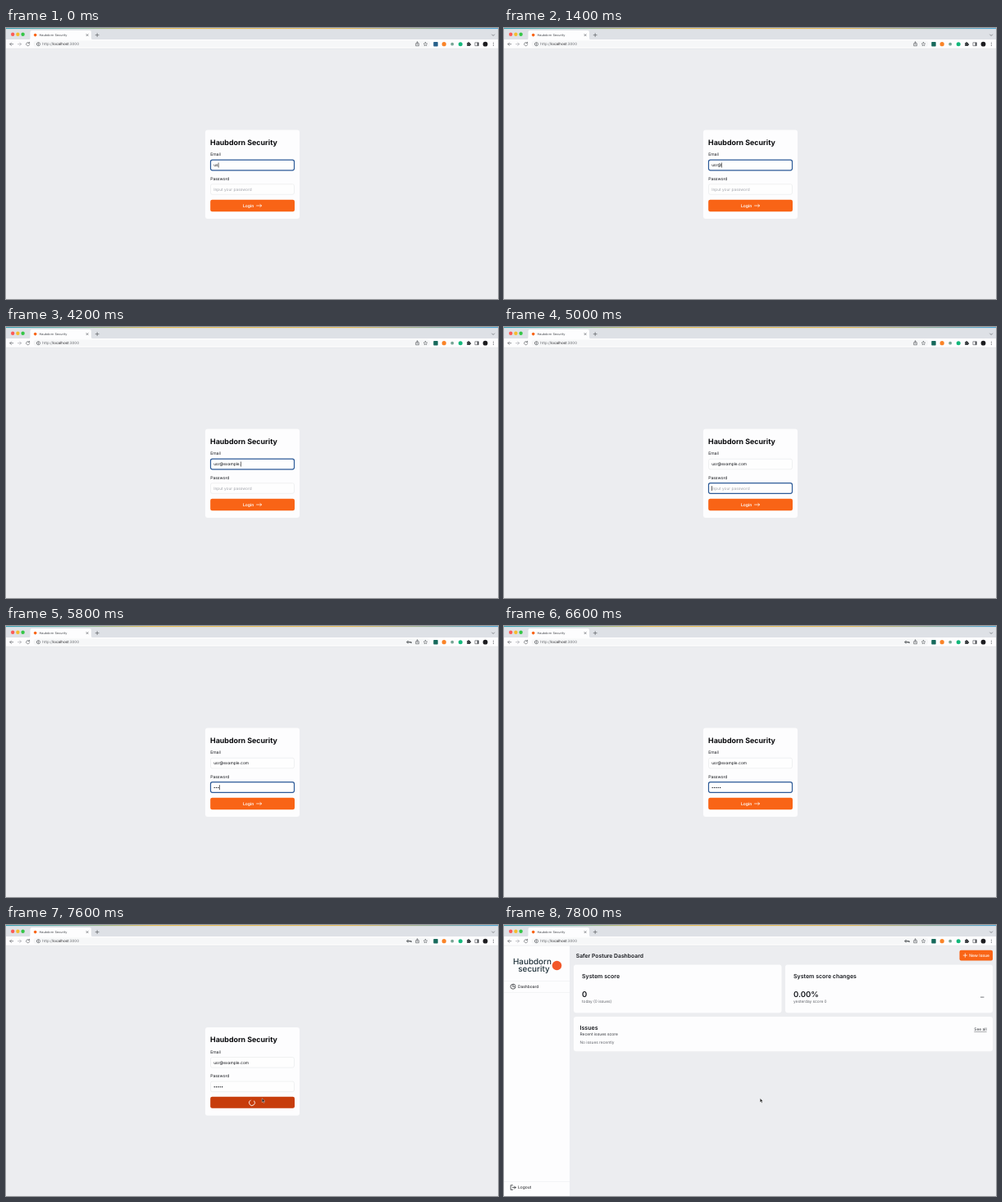
Animation, 600 px wide and 331 px high, one loop 8 s. Source, as an HTML page:

```html
<!DOCTYPE html>
<html lang="en">
<head>
<meta charset="utf-8">
<title>Login</title>
<style>
  html, body { margin: 0; height: 100%; overflow: hidden; background: #ecedf0; }
  svg { display: block; width: 100%; height: 100%; }
  text { font-family: Inter, Roboto, sans-serif; text-rendering: geometricPrecision; white-space: pre; }
  .line { fill: none; stroke-linecap: round; stroke-linejoin: round; }
</style>
</head>
<body>
<svg id="stage" viewBox="0 0 600 331"></svg>
<script>
const LOOP = 8000, STEP = 200;
const BRAND = 'Haubdorn Security';
const EMAIL = 'usr@example.com';
const ORANGE = '#f96416', INK = '#15171c', GREY = '#62656c';

// Each entry: start time, number of typed characters, caret visible
const emailKeys = [
  [0, 2, 1], [400, 2, 0], [800, 2, 1], [1000, 3, 1], [1400, 4, 1], [1800, 5, 1],
  [2200, 6, 1], [2400, 7, 1], [2600, 8, 1], [3000, 9, 1], [3200, 10, 1], [3400, 11, 1],
  [3800, 11, 0], [4200, 12, 1], [4600, 14, 1], [4800, 15, 1], [5000, 15, 0]
];
const passwordKeys = [
  [0, 0, 0], [5000, 0, 1], [5200, 1, 1], [5400, 2, 1], [5800, 3, 1],
  [6000, 4, 1], [6200, 5, 1], [6600, 5, 0], [7000, 5, 1], [7400, 5, 0]
];

const rect = (x, y, w, h, fill, r = 0, more = '') =>
  `<rect x="${x}" y="${y}" width="${w}" height="${h}" rx="${r}" fill="${fill}" ${more}/>`;
const dot = (x, y, r, fill) => `<circle cx="${x}" cy="${y}" r="${r}" fill="${fill}"/>`;
const line = (d, stroke = '#4b4e53', width = .6, more = '') =>
  `<path class="line" d="${d}" stroke="${stroke}" stroke-width="${width}" ${more}/>`;
// y is the middle of the capitals
const text = (x, y, size, str, fill = INK, weight = 400, more = '') =>
  `<text x="${x}" y="${y + size * .364}" font-size="${size}" font-weight="${weight}" fill="${fill}" ${more}>${str}</text>`;

function browserBar() {
  const lights = ['#fc5b57', '#f5bd2f', '#35c648'].map((c, i) => dot(8.2 + i * 6.2, 7.7, 2.2, c)).join('');
  return rect(0, 0, 600, 14.5, '#dee1e6') + rect(0, 0, 600, 1.1, 'url(#strip)') + lights +
    `<path d="M27 14.5Q29.5 14.5 29.5 12V5Q29.5 3 31.5 3H102Q104 3 104 5V12Q104 14.5 106.500 14.5Z" fill="#fdfdfe"/>` +
    dot(35.7, 8.6, 1.8, ORANGE) + text(40.5, 8.6, 3.8, BRAND, '#44474c') +
    line('M98 7.500l2.200 2.200m0-2.200l-2.200 2.200M109.200 8.600h4m-2-2v4M592.600 8l1.500 1.500l1.500-1.500') +
    rect(0, 14, 600, 11, '#fdfdfe') + rect(0, 24.8, 600, .5, '#dfe1e5') +
    rect(33.500, 15.600, 484, 8, '#f6f7f8', 4) +
    line('M8.800 19.700h-4m1.800-1.800l-1.800 1.800l1.800 1.800') +
    line('M14.500 19.700h4m-1.800-1.800l1.800 1.800l-1.800 1.800', '#9a9da2') +
    line('M28.500 18.500a2.100 2.100 0 1 0 .3 1.700m-.2-3v1.500h-1.500') +
    line('M37.400 19.700a2.100 2.100 0 1 0 4.200 0a2.100 2.100 0 1 0-4.200 0M39.500 19.600v1.100M39.500 18.500v.1') +
    text(44.300, 19.700, 4.5, '<tspan fill="#696c71">http://</tspan>localhost<tspan fill="#696c71">:3000</tspan>', '#202124') +
    line('M500.500 18.800h-.8v3h3.800v-3h-.8M501.600 20.300v-3.300m-1 .9l1-.9l1 .9') +
    line('M511.500 17.400l.7 1.500l1.600.2l-1.200 1.100l.3 1.600l-1.400-.8l-1.400.8l.3-1.600l-1.200-1.100l1.600-.2z', '#4b4e53', .5) +
    `<rect id="extension" x="521.300" y="17.100" width="5.400" height="5.400" rx=".7"/>` +
    dot(534.200, 19.700, 2.600, '#fa8428') + dot(544.200, 19.700, 1.900, '#76a595') + dot(554.200, 19.700, 2.500, '#13b87b') +
    `<path d="M562.200 18.100h1.200a.8.8 0 1 1 1.500 0h1.200v1.300a.8.8 0 1 1 0 1.500v1.200h-3.900z" fill="#3c4043"/>` +
    line('M572.300 17.800h4v3.900h-4z') + rect(574.600, 17.800, 1.700, 3.900, '#4b4e53') +
    dot(584.500, 19.700, 2.900, '#1d1d20') + [-1.7, 0, 1.7].map(d => dot(594.300, 19.700 + d, .5, '#4b4e53')).join('') +
    `<g id="key">${line('M491.200 19.700h3.100v1m-1.200-1v.8M488.900 19.700a1.100 1.100 0 1 0 2.300 0a1.100 1.100 0 1 0-2.300 0', '#3c4043', .8)}</g>`;
}

function field(id, y) {
  return `<rect id="${id}Box" x="249.500" y="${y}" width="102" height="12.600" rx="2.200" fill="#fefefe"/>`;
}

function loginPage() {
  return `<g id="login">
    <rect id="card" x="243" width="115" rx="3" fill="#fdfdfe"/>
    <g id="form">
      ${text(249, 139.3, 8.9, BRAND, '#090a0d', 700)}
      ${text(249.2, 154.6, 5, 'Email')}
      ${field('email', 161.2)}
      ${text(253.2, 167.6, 4.9, '', INK, 400, 'id="emailText"')}
      ${text(249.2, 184, 5, 'Password')}
      ${field('password', 190.7)}
      ${text(253.2, 197.1, 4.8, 'Input your password', '#a0a3aa', 400, 'id="hint"')}
      <g id="dots">${[0, 1, 2, 3, 4].map(i => dot(254.2 + i * 2.35, 197.4, .7, INK)).join('')}</g>
      <rect id="caret" width=".6" height="6" fill="#111"/>
    </g>
    <rect id="button" x="249.200" y="209.700" width="102.800" rx="2.300"/>
    <g id="buttonLabel">
      ${text(289, 216.8, 5, 'Login', '#fff', 600)}
      ${line('M305.600 217h6m-1.700-1.500l1.700 1.500l-1.700 1.500', '#fff', .7)}
    </g>
    ${line('M298.200 214a3.500 3.500 0 1 0 4.600 1', '#fff', .9, 'id="spinner"')}
  </g>`;
}

function dashboard() {
  return `<g id="dashboard">` +
    rect(0, 25, 80, 306, '#fdfdfe') +
    text(11, 44, 9.9, 'Haubdorn', '#1d3039', 500) + text(17.3, 53, 9.9, 'security', '#1d3039', 500) + dot(64.5, 49.5, 5.8, '#f2582a') +
    [68, 82.3, 313].map(y => rect(0, y, 80, .5, '#e9eaed')).join('') +
    line('M11 72.200a3 3 0 1 0 3 3h-3zM12.200 72.200a3 3 0 0 1 1.800 1.800', INK, .7) +
    text(17, 75.4, 4.9, 'Dashboard') +
    line('M10.500 317.800h-2.300v5.600h2.300M10.500 320.600h3.700m-1.600-1.600l1.600 1.600l-1.600 1.600', INK, .7) +
    text(17, 320.5, 4.9, 'Logout') +
    text(87.8, 37.4, 6.8, 'Safer Posture Dashboard', INK, 600) +
    rect(555.5, 30.8, 40.500, 12.600, ORANGE, 2) +
    line('M560.200 37.100h4.400m-2.200-2.200v4.400', '#fff', .7) + text(567.2, 37.1, 5, 'New Issue', '#fff', 500) +
    rect(85, 48.5, 253.500, 58.800, '#fdfdfe', 3) + rect(343, 48.5, 253, 58.800, '#fdfdfe', 3) + rect(85, 112, 511, 42.300, '#fdfdfe', 3) +
    text(95, 62.4, 7, 'System score', INK, 600) + text(95, 84.3, 9.5, '0', INK, 600) + text(95, 93.5, 4.8, 'today (0 issues)', GREY) +
    text(353, 62.4, 7, 'System score changes', INK, 600) + text(353, 84.3, 9.5, '0.00%', INK, 600) + text(353, 93.5, 4.8, 'yesterday score 0', GREY) +
    rect(581, 87.700, 4.400, .8, '#55585f') +
    text(92.5, 125, 7.1, 'Issues', INK, 600) + text(92.5, 133, 4.9, 'Recent issues score', '#33363c') +
    text(92.5, 143, 4.8, 'No issues recently', GREY) +
    text(573.3, 127, 4.9, 'See all', '#33363c') + rect(573.300, 130, 15.300, .4, '#33363c') + `</g>`;
}

const stage = document.getElementById('stage');
stage.innerHTML = `<defs><linearGradient id="strip">
    <stop stop-color="#3aa2b4"/><stop offset=".15" stop-color="#7fb5a2"/><stop offset=".3" stop-color="#e5bd55"/>
    <stop offset=".7" stop-color="#e3b95a"/><stop offset="1" stop-color="#4ea5d3"/></linearGradient></defs>` +
  rect(0, 0, 600, 331, '#ecedf0') + loginPage() + dashboard() + browserBar() +
  `<path id="pointer" d="M0 0v4.800l1.100-1l.8 1.700l.9-.4l-.8-1.700h1.500z" fill="#111" stroke="#fff" stroke-width=".4"/>`;

const el = id => document.getElementById(id);
const show = (id, on) => el(id).setAttribute('display', on ? 'inline' : 'none');
const set = (id, attrs) => Object.entries(attrs).forEach(([k, v]) => el(id).setAttribute(k, v));
const at = (keys, t) => keys.findLast(k => k[0] <= t);

function focusBox(id, on) {
  set(id + 'Box', { stroke: on ? '#2c5a98' : '#e6e7ea', 'stroke-width': on ? 1.2 : .6 });
}

function render(now) {
  const t = Math.floor(now % LOOP / STEP) * STEP;
  const [, letters, emailCaret] = at(emailKeys, t);
  const [, stars, passwordCaret] = at(passwordKeys, t);
  const loading = t >= 7600, done = t >= 7800;

  show('login', !done);
  show('dashboard', done);
  show('key', t >= 5200);
  set('extension', { fill: t < 800 ? '#27608a' : '#176a5c' });

  el('emailText').textContent = EMAIL.slice(0, letters);
  focusBox('email', t < 5000);
  focusBox('password', t >= 5000 && t < 7400);
  show('hint', stars === 0);
  [...el('dots').children].forEach((d, i) => d.setAttribute('display', i < stars ? 'inline' : 'none'));

  show('caret', emailCaret || passwordCaret);
  const caretX = passwordCaret ? 253.2 + stars * 2.35 : 253.3 + (done ? 0 : el('emailText').getComputedTextLength());
  set('caret', { x: caretX, y: passwordCaret ? 194.1 : 164.5 });

  // The card is slightly shorter while the spinner replaces the label
  set('card', { y: loading ? 125 : 124.5, height: loading ? 107.7 : 108.6 });
  set('form', { transform: `translate(0 ${loading ? .4 : 0})` });
  set('button', { height: loading ? 14 : 14.5, fill: t >= 7400 ? '#c73d0c' : ORANGE });
  show('buttonLabel', !loading);
  show('spinner', loading);

  show('pointer', t >= 7200);
  set('pointer', { transform: t < 7400 ? 'translate(322 234)' : 'translate(312.300 211.800)' });
}

function tick() {
  render(performance.now());
  requestAnimationFrame(tick);
}
tick();
</script>
</body>
</html>
```
